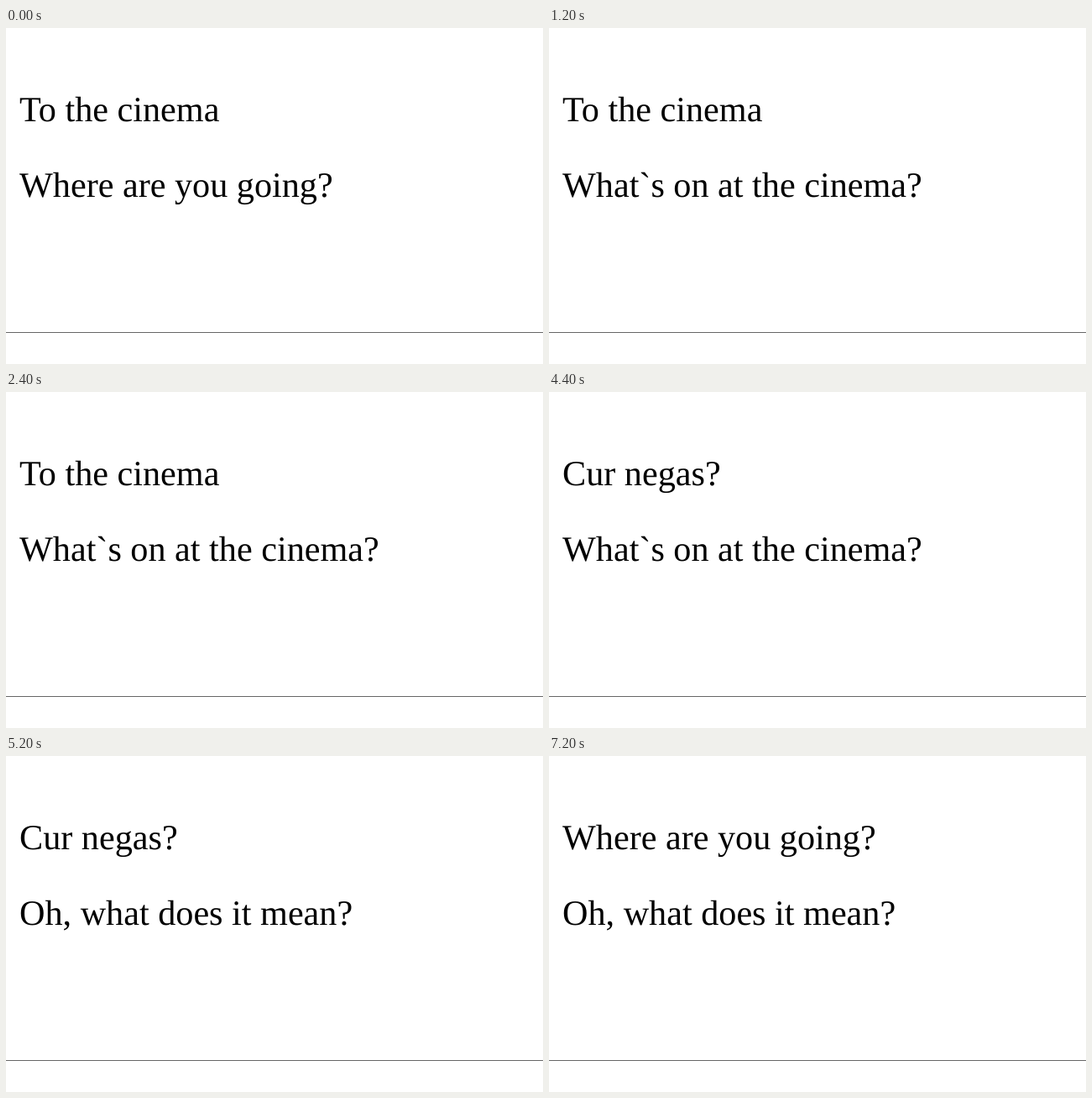
These frames come from a looping animation (640x400 px, 8000 ms). An HTML page:

```html
<!DOCTYPE html>
<html lang="en">
<head>
<meta charset="utf-8">
<title>Dialogue</title>
<style>
  html, body { margin: 0; width: 100%; height: 100%; overflow: hidden; background: #fff; }
  svg { display: block; width: 100%; height: 100%; }
  text {
    font: 42.2px "Liberation Serif", "Times New Roman", Times, serif;
    fill: #000;
    text-rendering: geometricPrecision;
  }
</style>
</head>
<body>
<svg viewBox="0 0 640 400">
  <text id="upper" x="16" y="111"></text>
  <text id="lower" x="16" y="201"></text>
  <rect y="362" width="640" height="1" fill="#666"/>
</svg>
<script>
  const LOOP = 8000;

  // Each line lists [start in ms, text].
  const lines = {
    upper: [[0, "To the cinema"], [3200, "Cur negas?"], [7200, "Where are you going?"]],
    lower: [[0, "Where are you going?"], [1200, "What`s on at the cinema?"], [5200, "Oh, what does it mean?"]]
  };

  function textAt(cues, time) {
    return cues.filter(([start]) => start <= time).pop()[1];
  }

  function render(time) {
    for (const [id, cues] of Object.entries(lines)) {
      const node = document.getElementById(id);
      const text = textAt(cues, time);
      if (node.textContent !== text) node.textContent = text;
    }
  }

  const begin = performance.now();

  function tick() {
    render((performance.now() - begin) % LOOP);
    requestAnimationFrame(tick);
  }

  tick();
</script>
</body>
</html>
```
